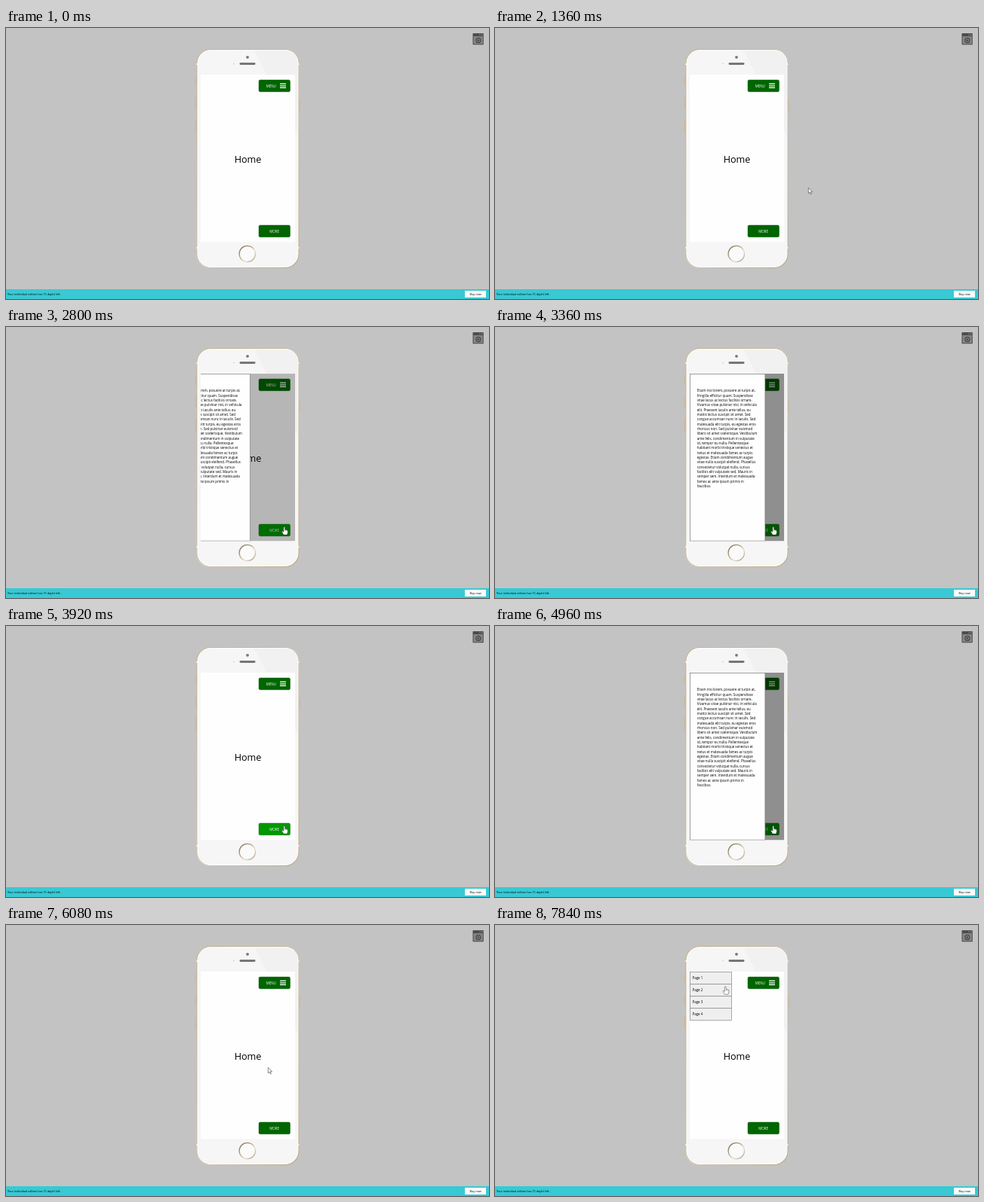
Animation, 640 px wide and 360 px high, one loop 8 s. Source, as an HTML page:

```html
<!DOCTYPE html>
<html lang="en">
<head>
<meta charset="utf-8">
<title>Phone prototype</title>
<style>
html, body { margin: 0; width: 100%; height: 100%; overflow: hidden; background: #c3c3c3; }
svg { display: block; width: 100vw; height: 100vh; }
text { font-family: "Open Sans", "Noto Sans", sans-serif; }
.small { font-size: 4.45px; }
</style>
</head>
<body>
<svg viewBox="0 0 640 360">
  <defs>
    <linearGradient id="rim" x1="0" y1="0" x2="1" y2="1">
      <stop offset="0" stop-color="#d3c5ab"/>
      <stop offset=".5" stop-color="#e0d6c4"/>
      <stop offset="1" stop-color="#bda988"/>
    </linearGradient>
    <linearGradient id="ring" x1="0" y1="0" x2="1" y2="1">
      <stop offset="0" stop-color="#75664f"/>
      <stop offset=".4" stop-color="#b9a88a"/>
      <stop offset=".65" stop-color="#eae3d6"/>
      <stop offset="1" stop-color="#9c8a6c"/>
    </linearGradient>
    <clipPath id="screenClip"><rect x="258" y="62" width="125" height="222.5"/></clipPath>
    <clipPath id="bodyClip"><rect x="254" y="29.5" width="133" height="288" rx="17"/></clipPath>
  </defs>

  <rect width="640" height="360" fill="#c3c3c3"/>

  <!-- window icon -->
  <g>
    <rect x="618.5" y="7" width="14.3" height="15.3" rx=".8" fill="#4d4d4d"/>
    <rect x="619.5" y="11" width="12.3" height="10.3" fill="#858585"/>
    <path d="M627.5 9h1M630 9h1.3" stroke="#bbb" stroke-width="1"/>
    <circle cx="625.9" cy="16.4" r="3.6" fill="#484848"/>
    <circle cx="625.9" cy="16.4" r="1.9" fill="none" stroke="#a5a5a5" stroke-width=".8"/>
  </g>

  <!-- phone -->
  <g>
    <path d="M251.4 65v11M251.4 92v15M251.4 121v18M388.8 95v17" stroke="#c9b99c" stroke-width="1.3"/>
    <rect x="252.3" y="28" width="136" height="291" rx="18" fill="url(#rim)"/>
    <rect x="252.9" y="28.6" width="134.8" height="289.4" rx="17.6" fill="none" stroke="#b7a585" stroke-width=".6"/>
    <path d="M252.2 48h2M386.4 48h2M252.2 292h2M386.4 292h2" stroke="#f4f1ea" stroke-width="2"/>
    <rect x="254" y="29.5" width="133" height="288" rx="17" fill="#f6f6f6"/>
    <path d="M329 29h60v120z" fill="#f1f1f1" clip-path="url(#bodyClip)"/>
    <rect x="254" y="29.5" width="133" height="288" rx="17" fill="none" stroke="#fff" stroke-width=".9"/>
    <circle cx="320" cy="38.8" r="1.9" fill="#777"/>
    <circle cx="302" cy="47.5" r=".8" fill="#ccc"/>
    <rect x="309.5" y="46.1" width="21" height="2.8" rx="1.4" fill="#777"/>
    <circle cx="319.8" cy="300" r="10.7" fill="#fafafa" stroke="url(#ring)" stroke-width="1.3"/>
  </g>

  <!-- screen -->
  <g clip-path="url(#screenClip)">
    <rect x="258" y="62" width="125" height="222.5" fill="#fefefe"/>
    <text x="320.5" y="178.9" font-size="12.6" text-anchor="middle">Home</text>
    <rect id="menuBtn" x="335" y="68.9" width="41.5" height="15.8" rx="1.8" stroke="#005000" stroke-width=".4"/>
    <text class="small" x="344.8" y="78.6" fill="#fff">MENU</text>
    <path d="M363 74.2h8M363 76.8h8M363 79.4h8" stroke="#fff" stroke-width="1.2"/>
    <rect id="moreBtn" x="335" y="261.9" width="41.5" height="15.8" rx="1.8" stroke="#005000" stroke-width=".4"/>
    <text class="small" x="349.2" y="271.6" fill="#fff">MORE</text>
    <g id="menu"></g>
    <rect id="shade" x="258" y="62" width="125" height="222.5"/>
    <g id="panel">
      <rect x="258.3" y="62.3" width="99.6" height="221.8" fill="#fefefe" stroke="#777" stroke-width=".6"/>
    </g>
  </g>

  <!-- bottom bar -->
  <rect y="347" width="640" height="13" fill="#38c9d4"/>
  <text x="2" y="354.9" font-size="3.77">Your individual edition has 15 day(s) left.</text>
  <rect x="608" y="349" width="28" height="9" fill="#fcfcfc"/>
  <text x="614.4" y="354.9" font-size="3.85">Buy now</text>

  <g id="arrow">
    <path d="M0 0V7.4L1.7 5.9L2.9 8.6L4.1 8.1L2.9 5.4H5.2Z" fill="#fff" stroke="#333" stroke-width=".55" stroke-linejoin="round"/>
  </g>
  <g id="hand">
    <path d="M-.9 .8Q0 -.4 .9 .8V4Q1.8 3.4 2.2 4.3Q3 3.8 3.5 4.7Q4.7 4.5 4.6 5.8V7.8L3.7 10.7H-.9L-3.2 6.9Q-3.3 5.6 -2 5.9L-.9 7Z" fill="#fff" stroke="#333" stroke-width=".5" stroke-linejoin="round"/>
    <path d="M.9 4v1.9M2.2 4.5v1.6M3.5 4.9v1.3" stroke="#555" stroke-width=".35"/>
  </g>
</svg>
<script>
const LOOP = 8000, STEP = 80, PANEL_W = 100;
const $ = id => document.getElementById(id);

const lines = `Etiam nisi lorem, posuere at turpis at,
fringilla efficitur quam. Suspendisse
vitae lacus ac lectus facilisis ornare.
Vivamus vitae pulvinar nisi, in vehicula
elit. Praesent iaculis ante tellus, eu
mattis lectus suscipit sit amet. Sed
congue accumsan nunc in iaculis. Sed
malesuada elit turpis, eu egestas eros
rhoncus non. Sed pulvinar euismod
libero sit amet scelerisque. Vestibulum
ante felis, condimentum in vulputate
id, tempor eu nulla. Pellentesque
habitant morbi tristique senectus et
netus et malesuada fames ac turpis
egestas. Etiam condimentum augue
vitae nulla suscipit eleifend. Phasellus
consectetur volutpat nulla, cursus
facilisis elit vulputate sed. Mauris in
semper sem. Interdum et malesuada
fames ac ante ipsum primis in
faucibus.`.split("\n");

function add(parent, tag, attrs, label = "") {
  const el = document.createElementNS("http://www.w3.org/2000/svg", tag);
  for (const key in attrs) el.setAttribute(key, attrs[key]);
  el.textContent = label;
  parent.append(el);
}

lines.forEach((line, i) =>
  add($("panel"), "text", { class: "small", x: 267.8, y: 86.4 + i * 6.335 }, line));

for (let i = 0; i < 4; i++) {
  const y = 62.4 + i * 16;
  add($("menu"), "rect", { x: 258.3, y, width: 55.4, height: 16, fill: "#efefef", stroke: "#777", "stroke-width": .6 });
  add($("menu"), "text", { class: "small", x: 261.5, y: y + 9.9 }, "Page " + (i + 1));
}

// Pointer path: time, x, y
const path = [
  [640, 629.4, 225.4], [720, 629.4, 225.4], [800, 600, 220], [960, 530, 212.5],
  [1120, 468, 210.4], [1280, 427, 211], [1360, 415.3, 212.3], [1520, 386, 219],
  [1600, 376, 228], [1680, 376, 244], [1760, 371, 259], [1840, 369, 268],
  [2080, 368.8, 265.4], [6000, 368.8, 265.4], [6080, 347.3, 189.3],
  [6160, 340, 150], [6240, 342, 118], [6320, 349, 93], [6400, 355, 79],
  [6560, 358, 75], [7520, 358, 75], [7600, 344, 77], [7680, 325, 81],
  [7760, 311, 82], [7840, 305.3, 81.4], [8000, 305.3, 81.4]
];

function pointerAt(t) {
  const i = Math.max(1, path.findIndex(p => p[0] >= t));
  const [t0, x0, y0] = path[i - 1], [t1, x1, y1] = path[i];
  const k = (t - t0) / (t1 - t0);
  return [x0 + (x1 - x0) * k, y0 + (y1 - y0) * k];
}

const within = (t, from, to) => t >= from && t < to;
const swing = (t, start, length) => {
  const p = Math.min(1, Math.max(0, (t - start) / length));
  return .5 - .5 * Math.cos(Math.PI * p);
};
const openness = t =>
  swing(t, 2650, 250) - swing(t, 3680, 240) + swing(t, 4720, 240) - swing(t, 5600, 240);
const show = (id, on) => $(id).setAttribute("visibility", on ? "visible" : "hidden");

function draw(time) {
  const t = Math.floor(time % LOOP / STEP) * STEP;

  const open = openness(t);
  show("panel", open > .001);
  show("shade", open > .001);
  $("panel").setAttribute("transform", `translate(${(open - 1) * PANEL_W} 0)`);
  $("shade").setAttribute("opacity", .44 * open);
  show("menu", t >= 7040);

  const onMore = within(t, 1840, 6080);
  const onMenu = within(t, 6400, 7680);
  $("moreBtn").setAttribute("fill", onMore ? "#009900" : "#006600");
  $("menuBtn").setAttribute("fill", onMenu ? "#009900" : "#006600");

  const isHand = onMore || onMenu || t >= 7760;
  show("hand", isHand);
  show("arrow", t >= 640 && !isHand);
  if (t >= 640) {
    const [x, y] = pointerAt(t);
    $(isHand ? "hand" : "arrow").setAttribute("transform", `translate(${x} ${y})`);
  }
}

const begin = performance.now();
function tick() {
  draw(performance.now() - begin);
  requestAnimationFrame(tick);
}
tick();
</script>
</body>
</html>
```
